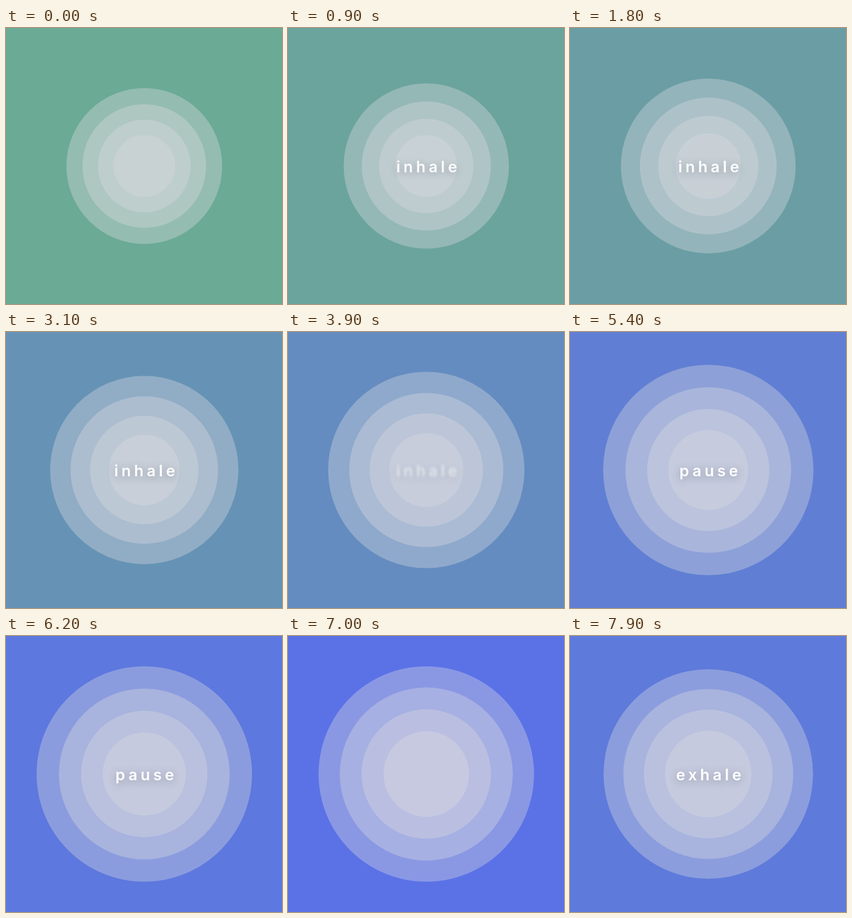
Recreate the animation shown at these times as an HTML page. Size 480 px wide and 480 px high, loop 8 s.

```html
<!DOCTYPE html>
<html lang="en">
<head>
<meta charset="utf-8">
<title>Breathing circle</title>
<style>
  html, body { margin: 0; width: 100%; height: 100%; overflow: hidden; }
  #stage { position: fixed; inset: 0; overflow: hidden; }
  svg { position: absolute; left: 0; top: 0; width: 480px; height: 480px; }
  circle { fill: rgba(217, 217, 222, .37); }
  .word {
    position: absolute; left: 124px; top: 222px; width: 240px;
    font: 600 27px/40px Inter, "Open Sans", sans-serif;
    letter-spacing: 5.5px; text-align: center; color: #fff;
    text-shadow: 0 3px 14px rgba(70, 80, 95, .42);
  }
</style>
</head>
<body>
<div id="stage"><svg viewBox="0 0 480 480"></svg></div>
<script>
const LOOP = 8000, STEP = 100;

const RINGS = 4, MAX_RADIUS = 188;
const PEAK = 6.6, LAG = 0.37;      // seconds: widest outer ring, delay per inner ring
const SPEED = 9.3, ROUND = 9.65;   // growth in px per second, softness of the turn
const MAX_SHRINK = 53.5;

const GREEN = [107, 170, 149], TEAL = [106, 158, 164], BLUE = [91, 114, 232];
const TEAL_AT = 1.8, BLUE_AT = 6.95;

const FADE_IN = 0.8, FADE_OUT = 0.6, BLUR = 4.5;
const words = [
  { text: "inhale", from: 0.2, to: 4.2 },
  { text: "pause", from: 4.3, to: 6.8 },
  { text: "exhale", from: 7, to: 11 }
];

const stage = document.getElementById("stage");
const svg = stage.firstElementChild;

const rings = Array.from({ length: RINGS }, () => {
  const ring = document.createElementNS(svg.namespaceURI, "circle");
  ring.setAttribute("cx", 240.5);
  ring.setAttribute("cy", 240);
  return svg.appendChild(ring);
});

for (const word of words) {
  word.el = document.createElement("div");
  word.el.className = "word";
  word.el.textContent = word.text;
  stage.append(word.el);
}

const clamp = x => Math.min(1, Math.max(0, x));
const smooth = x => x * x * (3 - 2 * x);
const mix = (a, b, u) => a.map((v, i) => Math.round(v + (b[i] - v) * u));

// Steady growth with a rounded turn at the peak; inner rings follow later.
function radius(t, i) {
  const away = SPEED * (t - PEAK - LAG * i);
  const shrink = Math.min(MAX_SHRINK, Math.hypot(ROUND, away) - ROUND);
  return (MAX_RADIUS - shrink) * (1 - i / (RINGS + 1));
}

// The colour runs from green to blue, then back the same way.
function background(t) {
  const s = BLUE_AT - Math.abs(t - BLUE_AT);
  return s < TEAL_AT
    ? mix(GREEN, TEAL, s / TEAL_AT)
    : mix(TEAL, BLUE, (s - TEAL_AT) / (BLUE_AT - TEAL_AT));
}

function draw(t) {
  stage.style.background = `rgb(${background(t)})`;
  rings.forEach((ring, i) => ring.setAttribute("r", radius(t, i)));
  for (const { el, from, to } of words) {
    const shown = smooth(clamp((t - from) / FADE_IN)) * smooth(clamp((to - t) / FADE_OUT));
    el.style.opacity = shown;
    el.style.filter = shown < 1 ? `blur(${BLUR * (1 - shown)}px)` : "none";
  }
}

const start = performance.now();
function tick() {
  const t = (performance.now() - start) % LOOP;
  draw(Math.floor(t / STEP) * STEP / 1000);
  requestAnimationFrame(tick);
}
tick();
</script>
</body>
</html>
```
